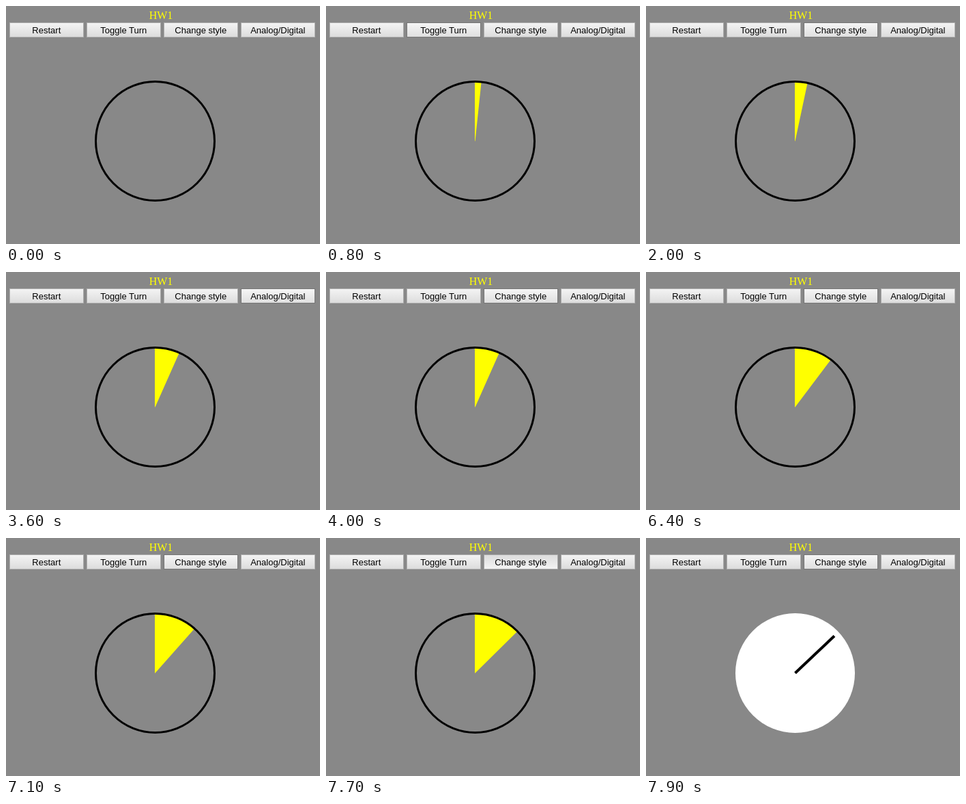
These frames come from a looping animation (460 by 348 pixels, 8 s). An HTML page:

```html
<!DOCTYPE html>
<html lang="en">
<head>
<meta charset="utf-8">
<title>HW1</title>
<style>
html, body { margin: 0; width: 100%; height: 100%; overflow: hidden; background: #888; }
svg { display: block; }
text { text-anchor: middle; }
.title { font: 16px "Liberation Serif", serif; fill: #ff0; }
.label { font: 13px "Liberation Sans", sans-serif; fill: #000; }
.button rect { fill: url(#normal); stroke: #adadad; }
.button.hover rect { fill: url(#hover); stroke: #757575; }
.button.active rect { fill: url(#active); stroke: #a6a6a6; }
</style>
</head>
<body>
<svg width="460" height="348" viewBox="0 0 460 348">
  <defs>
    <linearGradient id="normal" x2="0" y2="1"><stop stop-color="#f4f4f4"/><stop offset="1" stop-color="#dcdcdc"/></linearGradient>
    <linearGradient id="hover" x2="0" y2="1"><stop stop-color="#f6f6f6"/><stop offset="1" stop-color="#dfdfdf"/></linearGradient>
    <linearGradient id="active" x2="0" y2="1"><stop stop-color="#dcdcdc"/><stop offset="1" stop-color="#f4f4f4"/></linearGradient>
  </defs>
  <text class="title" x="227" y="19">HW1</text>
  <g id="buttons"></g>
  <g transform="translate(218.5 197.5)">
    <g id="pie">
      <path id="wedge" fill="#ff0"/>
      <circle r="87" fill="none" stroke="#000" stroke-width="3"/>
    </g>
    <g id="dial">
      <circle r="87.5" fill="#fff"/>
      <path id="hand" d="M0 0V-79" stroke="#000" stroke-width="4"/>
    </g>
  </g>
</svg>
<script>
const LOOP = 8000, STEP = 100;
const $ = id => document.getElementById(id);

$('buttons').innerHTML = ['Restart', 'Toggle Turn', 'Change style', 'Analog/Digital'].map((label, i) =>
  `<g class="button" transform="translate(${5 + 113 * i} 24)">
    <rect x=".5" y=".5" width="108" height="21"/>
    <text class="label" x="54.3" y="16">${label}</text>
  </g>`).join('');
const buttons = [...$('buttons').children];

// [start time, hovered button]
const hovers = [[0, -1], [500, 1], [1900, -1], [2000, 2], [3100, 3], [4000, 2]];
const presses = [600, 3700, 7700];
const ticks = [800, 1700, 2700, 3600];
const SWEEP = 4500, RESTYLE = 7800;

// Whole seconds first, then a smooth sweep; in degrees
const angleAt = t => t < SWEEP
  ? 6 * ticks.filter(tick => t >= tick).length
  : 24.9 + 0.0064 * (t - SWEEP);

function draw(now) {
  const t = Math.floor(now % LOOP / STEP) * STEP;
  const hovered = hovers.filter(([start]) => t >= start).pop()[1];
  const pressed = presses.includes(t);
  buttons.forEach((button, i) => {
    button.classList.toggle('hover', i === hovered);
    button.classList.toggle('active', i === hovered && pressed);
  });

  const angle = angleAt(t), a = angle * Math.PI / 180, r = 87;
  $('wedge').setAttribute('d', angle
    ? `M-.5 0V${-r}H0A${r} ${r} 0 0 1 ${r * Math.sin(a)} ${-r * Math.cos(a)}L0 0Z` : '');
  $('hand').setAttribute('transform', `rotate(${angle})`);

  const dial = t >= RESTYLE;
  $('pie').style.display = dial ? 'none' : '';
  $('dial').style.display = dial ? '' : 'none';
}

const start = performance.now();
function frame() {
  draw(performance.now() - start);
  requestAnimationFrame(frame);
}
frame();
</script>
</body>
</html>
```
